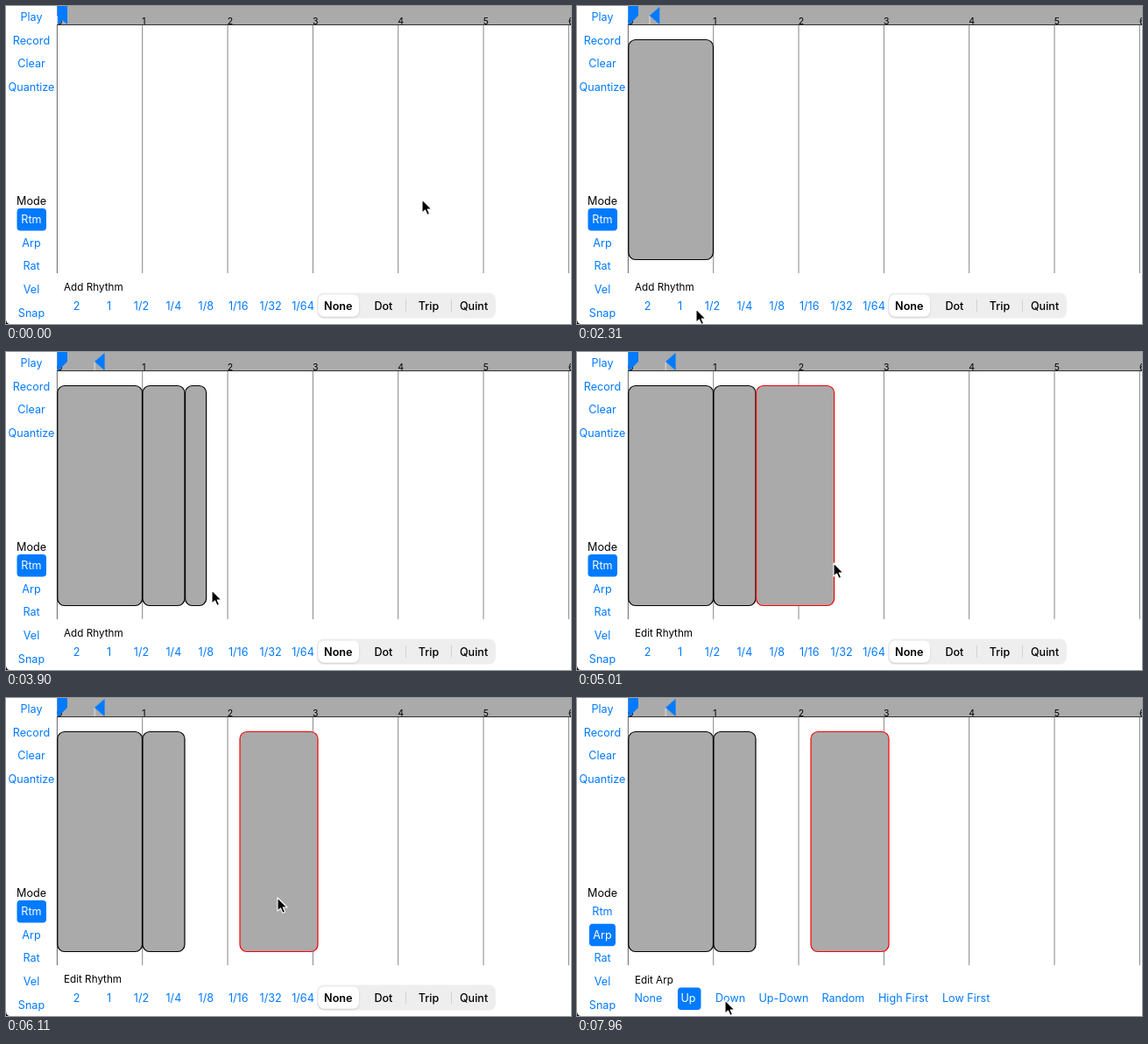
An HTML page that plays this animation: 645 px wide and 363 px high, repeating every 8000 ms.

```html
<!DOCTYPE html>
<html lang="en">
<head>
<meta charset="utf-8">
<title>Rhythm editor</title>
<style>
html, body { margin: 0; width: 100%; height: 100%; overflow: hidden; background: #fff; }
svg { display: block; width: 645px; height: 363px; }
text { font: 12.6px Inter, "Liberation Sans", sans-serif; fill: #000; }
.link { fill: #007aff; }
.inv { fill: #fff; }
.small { font-size: 11.7px; }
.num { font-size: 10.5px; }
.seg { font-weight: 500; }
.seg.sel { font-weight: 600; }
.blue { fill: #007aff; }
.block { fill: #aaa; stroke: #000; stroke-width: 1.2; }

.anim { animation: 8s step-end -8ms infinite; }
#cursor { animation-name: cursor; }
#end { animation-name: end; }
#b1 { animation-name: show1; }
#b2 { animation-name: show2; }
#b3 { animation-name: show3, size3; }
#add { animation-name: addLabel; }
#edit { animation-name: editLabel; }
#rtm { animation-name: rtm; }
#arp { animation-name: arp; }
#arpNone { animation-name: arpNone; }
#arpUp { animation-name: arpUp; }

@keyframes show1 { 0% { opacity: 0 } 23%, 100% { opacity: 1 } }
@keyframes show2 { 0% { opacity: 0 } 34.63%, 100% { opacity: 1 } }
@keyframes show3 { 0% { opacity: 0 } 43.63%, 100% { opacity: 1 } }
@keyframes addLabel { 0% { opacity: 1 } 59%, 100% { opacity: 0 } }
@keyframes editLabel { 0% { opacity: 0 } 59%, 100% { opacity: 1 } }
@keyframes rtm { 0% { opacity: 1 } 88.63%, 100% { opacity: 0 } }
@keyframes arp { 0% { opacity: 0 } 88.63%, 100% { opacity: 1 } }
@keyframes arpNone { 0% { opacity: 1 } 98.88%, 100% { opacity: 0 } }
@keyframes arpUp { 0% { opacity: 0 } 98.88%, 100% { opacity: 1 } }

/* end marker sits at a quarter of the pattern length */
@keyframes end {
  0% { transform: translateX(0) }
  23% { transform: translateX(24.3px) }
  34.63% { transform: translateX(36.5px) }
  43.63%, 100% { transform: translateX(42.6px) }
}

/* stretched by its right edge, then dragged */
@keyframes size3 {
  0% { x: 204.6px; width: 24px; stroke: #000 }
  59% { x: 204.6px; width: 24px; stroke: #f00; animation-timing-function: steps(6, start) }
  63.38% { x: 204.6px; width: 89px; stroke: #f00 }
  67.75% { x: 204.6px; width: 89px; stroke: #f00; animation-timing-function: steps(7, start) }
  73.38%, 100% { x: 267px; width: 89px; stroke: #f00 }
}

@keyframes cursor {
  0% { transform: translate(475px, 221px) }
  3.75% { transform: translate(475px, 221px); animation-timing-function: steps(3, start) }
  5.95% { transform: translate(425px, 232px); animation-timing-function: steps(5, start) }
  9.61% { transform: translate(140px, 275px); animation-timing-function: steps(3, start) }
  11.81% { transform: translate(30px, 288px); animation-timing-function: steps(3, start) }
  14% { transform: translate(55px, 297px); animation-timing-function: steps(1, start) }
  14.75% { transform: translate(75px, 318px); animation-timing-function: steps(6, start) }
  19.25% { transform: translate(112px, 341px) }
  20.75% { transform: translate(113px, 341px) }
  26.75% { transform: translate(113px, 341px); animation-timing-function: steps(4, start) }
  29.58% { transform: translate(136px, 346px); animation-timing-function: steps(5, start) }
  33.13% { transform: translate(151px, 342px) }
  38.38% { transform: translate(151px, 342px); animation-timing-function: steps(5, start) }
  42.13% { transform: translate(187px, 342px) }
  47.38% { transform: translate(187px, 342px); animation-timing-function: steps(3, start) }
  49.38% { transform: translate(235px, 272px); animation-timing-function: steps(5, start) }
  53.38% { transform: translate(250px, 246px); animation-timing-function: steps(5, start) }
  57.5% { transform: translate(228px, 242px) }
  59% { transform: translate(228px, 242px); animation-timing-function: steps(6, start) }
  63.38% { transform: translate(293px, 241px) }
  66.25% { transform: translate(293px, 241px); animation-timing-function: steps(2, start) }
  67.75% { transform: translate(255px, 238px); animation-timing-function: steps(7, start) }
  73.38% { transform: translate(318px, 233px) }
  76.38% { transform: translate(318px, 233px); animation-timing-function: steps(1, start) }
  77.13% { transform: translate(310px, 228px); animation-timing-function: steps(4, start) }
  80% { transform: translate(215px, 162px); animation-timing-function: steps(3, start) }
  82.13% { transform: translate(150px, 143px); animation-timing-function: steps(4, start) }
  85% { transform: translate(45px, 235px); animation-timing-function: steps(2, start) }
  86.38% { transform: translate(24px, 264px) }
  89.38% { transform: translate(24px, 264px); animation-timing-function: steps(3, start) }
  91.63% { transform: translate(40px, 290px); animation-timing-function: steps(5, start) }
  95.25% { transform: translate(100px, 330px); animation-timing-function: steps(4, start) }
  98.88% { transform: translate(126px, 343px); animation-timing-function: steps(1, start) }
  99.5% { transform: translate(140px, 345px); animation-timing-function: steps(1, start) }
  100% { transform: translate(169px, 345px) }
}
</style>
</head>
<body>
<svg viewBox="0 0 645 363">
  <defs>
    <filter id="soft" x="-20%" y="-20%" width="140%" height="150%">
      <feDropShadow dx="0" dy="1" stdDeviation="1.2" flood-opacity=".16"/>
    </filter>
  </defs>
  <rect width="645" height="363" fill="#fff"/>
  <rect x="58" width="587" height="21.5" fill="#aaa"/>
  <g id="grid"></g>
  <path d="M58 21.5H645" stroke="#333" stroke-width="1.2"/>

  <path class="blue" d="M58.5 0H70V11L60 21H58.5Z"/>
  <g id="end" class="anim">
    <path d="M58.7 11V21" stroke="#e4e4e4"/>
    <path class="blue" d="M58.5 11L70 1V21Z"/>
  </g>

  <rect id="b1" class="block anim" x="58.8" y="38.5" width="96.7" height="251" rx="8"/>
  <rect id="b2" class="block anim" x="156" y="38.5" width="48" height="251" rx="8"/>
  <rect id="b3" class="block anim" x="204.6" y="38.5" width="24" height="251" rx="8"/>

  <g id="side"></g>

  <g id="rtm" class="anim">
    <rect class="blue" x="12.5" y="231" width="33.5" height="25.5" rx="4"/>
    <text class="inv" x="29" y="248" text-anchor="middle">Rtm</text>
    <text class="link" x="29" y="274.7" text-anchor="middle">Arp</text>
    <text id="add" class="small anim" x="66" y="325">Add Rhythm</text>
    <text id="edit" class="small anim" x="66" y="325">Edit Rhythm</text>
    <g id="lengths"></g>
    <rect x="355" y="327.5" width="204" height="29" rx="7.5" fill="#eeeeef"/>
    <path d="M456.5 335V349M508.5 335V349" stroke="#d2d2d5"/>
    <rect x="356.5" y="329.5" width="46.5" height="25" rx="6.5" fill="#fff" filter="url(#soft)"/>
    <g id="tuplets"></g>
  </g>

  <g id="arp" class="anim">
    <rect class="blue" x="14" y="257.8" width="30" height="25.5" rx="4"/>
    <text class="link" x="29" y="248" text-anchor="middle">Rtm</text>
    <text class="inv" x="29" y="274.7" text-anchor="middle">Arp</text>
    <text class="small" x="66" y="326">Edit Arp</text>
    <g id="arpNone" class="anim">
      <rect class="blue" x="66" y="330.5" width="40" height="25.5" rx="4"/>
      <text class="inv" x="69.5" y="347">None</text>
      <text class="link" x="122.5" y="347">Up</text>
    </g>
    <g id="arpUp" class="anim">
      <rect class="blue" x="115" y="330.5" width="26.5" height="25.5" rx="4"/>
      <text class="link" x="65.5" y="347">None</text>
      <text class="inv" x="118.5" y="347">Up</text>
    </g>
    <g id="styles"></g>
  </g>

  <path d="M0 358Q.3 362.7 4 363H0Z"/>
  <g id="cursor" class="anim">
    <path d="M0 0V15.2L3.5 12L6 17.4L8.6 16.2L6.2 11H11Z" stroke="#fff" stroke-width="1.1" stroke-linejoin="round"/>
  </g>
</svg>
<script>
const $ = id => document.getElementById(id);

function add(parent, tag, attrs, content = "") {
  const el = document.createElementNS("http://www.w3.org/2000/svg", tag);
  for (const key in attrs) el.setAttribute(key, attrs[key]);
  el.textContent = content;
  $(parent).append(el);
}

function label(parent, str, x, y, cls = "link", anchor = "middle") {
  add(parent, "text", { x, y, class: cls, "text-anchor": anchor }, str);
}

for (let i = 0; i < 7; i++) {
  const x = 58.4 + i * 97.33;
  add("grid", "path", { d: `M${x} 22V305`, stroke: i ? "#858585" : "#666" });
  label("grid", i, x - 0.4, 21, "num", "start");
}

["Play", "Record", "Clear", "Quantize"].forEach((s, i) => label("side", s, 29, 17 + i * 26.7));
label("side", "Mode", 29, 227, "");
["Rat", "Vel", "Snap"].forEach((s, i) => label("side", s, 29, 301.4 + i * 26.7));

["2", "1", "1/2", "1/4", "1/8", "1/16", "1/32", "1/64"]
  .forEach((s, i) => label("lengths", s, 80.7 + i * 36.9, 346.5));
["None", "Dot", "Trip", "Quint"]
  .forEach((s, i) => label("tuplets", s, 379.3 + i * 51.6, 347, i ? "seg" : "seg sel"));

const styles = { Down: 158, "Up-Down": 207.5, Random: 279.5, "High First": 344, "Low First": 417 };
for (const s in styles) label("styles", s, styles[s], 347, "link", "start");
</script>
</body>
</html>
```
